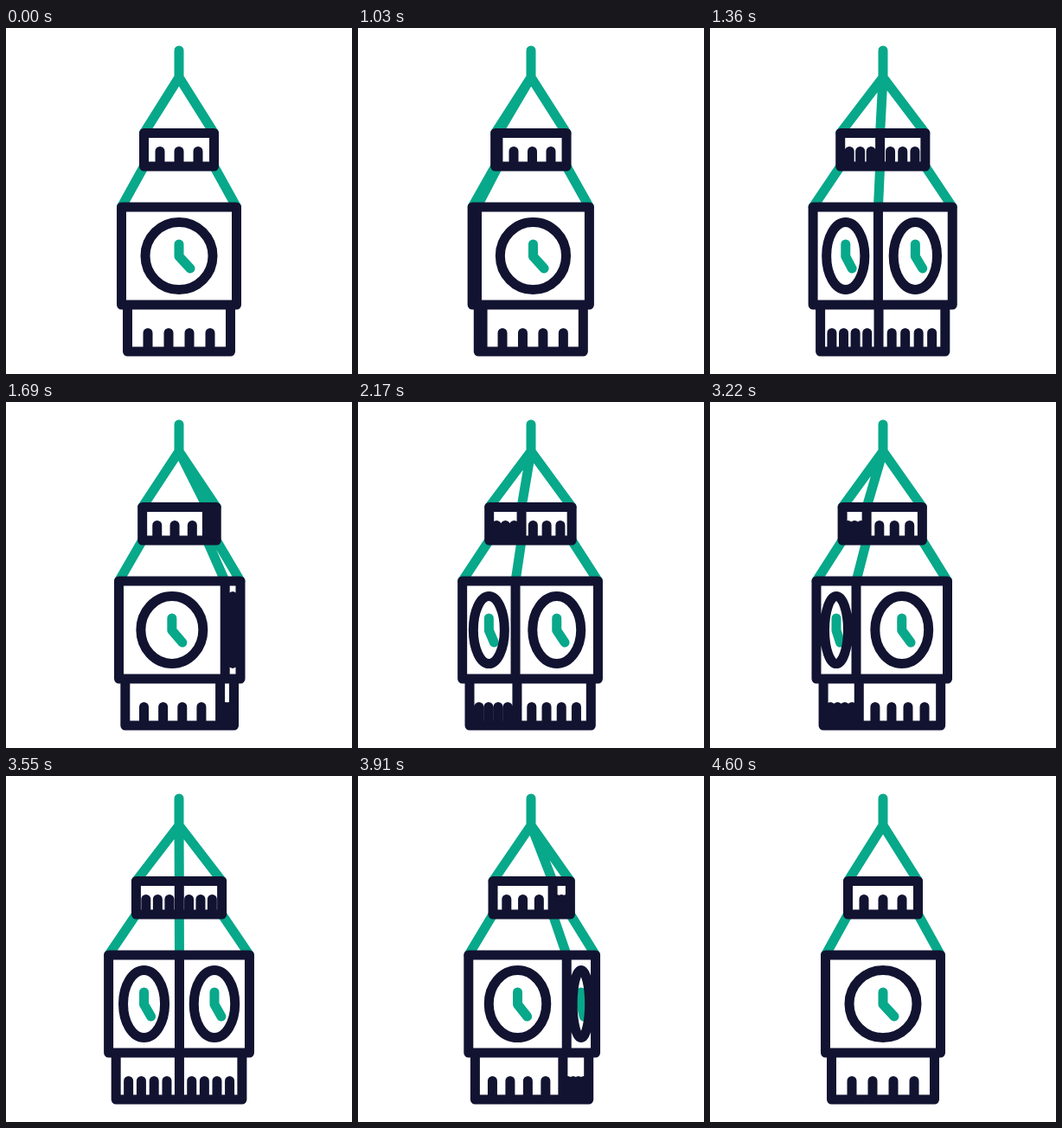
Animation of 400 by 400 pixels, one loop 4.63 s. Source, as an HTML page:

```html
<!DOCTYPE html>
<html>
<head>
<meta charset="utf-8">
<title>Clock tower</title>
<style>
html, body { margin: 0; height: 100%; overflow: hidden; background: #fff; }
svg { display: block; width: 100vw; height: 100vh; }
path { fill: none; stroke-width: 11; stroke-linecap: round; stroke-linejoin: round; }
</style>
</head>
<body>
<svg viewBox="0 0 400 400">
  <path id="accent" stroke="#08a88a"/>
  <path id="outline" stroke="#121331"/>
</svg>
<script>
const LOOP = 4630, START = 1030, STEP = 30;
const CAP = 40.5, BODY = 66.5, BASE = 59.5; // half widths seen from the front

// Time in ms and quarter turns done: a quick start that slowly runs out
const turnKeys = [[1000, 0], [1030, .03], [1540, .703], [1690, .9], [2170, 1.365], [2620, 1.85],
  [3220, 2.267], [3700, 2.62], [3910, 2.81], [4240, 2.935], [4600, 3]];

const slope = (a, b) => (b[1] - a[1]) / (b[0] - a[0]);

function tangent(i) {
  const k = turnKeys;
  if (i === 0) return slope(k[0], k[1]);
  if (i === k.length - 1) return 0;
  const a = slope(k[i - 1], k[i]), b = slope(k[i], k[i + 1]);
  return 2 * a * b / (a + b);
}

function turnsAt(t) {
  if (t < START || t >= 4600) return 0;
  const i = turnKeys.findIndex(k => k[0] > t) - 1;
  const [t0, p0] = turnKeys[i], [t1, p1] = turnKeys[i + 1];
  const d = t1 - t0, s = (t - t0) / d, r = 1 - s;
  return p0 * r * r * (1 + 2 * s) + p1 * s * s * (3 - 2 * s)
    + d * s * r * (tangent(i) * r - tangent(i + 1) * s);
}

const line = (...pts) => 'M' + pts.map(([x, y]) => x.toFixed(2) + ' ' + y).join('L');
const box = (l, r, top, bottom) => line([l, top], [r, top], [r, bottom], [l, bottom]) + 'Z';

function ellipse(cx, cy, rx, ry) {
  rx = Math.max(rx, .01);
  return `M${cx - rx} ${cy}a${rx} ${ry} 0 1 0 ${2 * rx} 0a${rx} ${ry} 0 1 0 ${-2 * rx} 0Z`;
}

function draw(t) {
  const mid = turnsAt(t) % 1 * 2 - 1; // near corner, -1 to 1
  const m = Math.abs(mid);
  const wide = 1 + .2256 * (1 - m);
  const narrow = wide + .038 * Math.sin(Math.PI * m);
  const corners = mid < 0 ? [-narrow, mid, wide] : [-wide, mid, narrow];
  const at = (half, c) => 200 + half * c;

  let teal = line([200, 26], [200, 57]), dark = '';
  for (const c of corners) {
    teal += line([200, 57], [at(CAP, c), 121.5]);
    teal += line([at(CAP, c), 160], [at(BODY, c), 207]);
  }
  for (const [l, r] of [corners.slice(0, 2), corners.slice(1)]) {
    const center = (l + r) / 2, scale = (r - l) / 2;
    const windows = (half, offsets, top, bottom) => offsets.map(o => {
      const x = at(half, center) + o * scale;
      return line([x, top], [x, bottom]);
    }).join('');
    const clock = at(BODY, center);

    teal += line([clock, 250], [clock, 264], [clock + 13 * scale, 278]);
    dark += box(at(CAP, l), at(CAP, r), 121.5, 160)
      + box(at(BODY, l), at(BODY, r), 207, 320)
      + box(at(BASE, l), at(BASE, r), 320, 374)
      + windows(CAP, [-22, 0, 22], 142.5, 160)
      + windows(BASE, [-36, -12, 12, 36], 352.5, 374)
      + ellipse(clock, 263.5, 39 * scale, 39);
  }
  accent.setAttribute('d', teal);
  outline.setAttribute('d', dark);
}

const accent = document.getElementById('accent');
const outline = document.getElementById('outline');
const origin = performance.now();

function tick() {
  const t = (performance.now() - origin) % LOOP;
  draw(START + Math.floor((t - START) / STEP) * STEP);
  requestAnimationFrame(tick);
}
tick();
</script>
</body>
</html>
```
